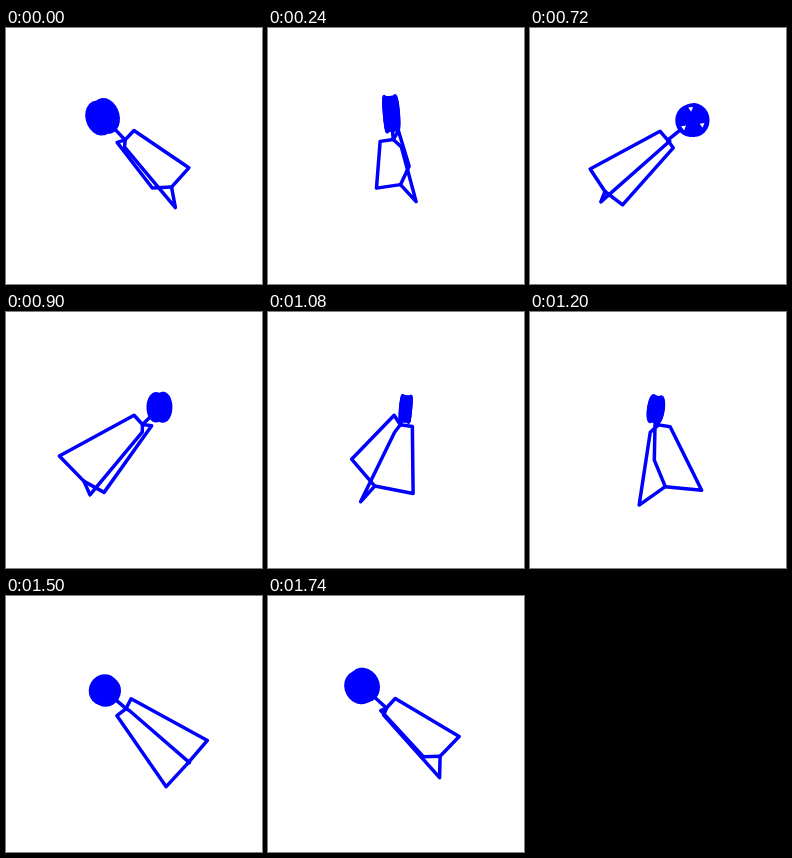
An HTML page with a canvas that plays this animation: 256 px wide and 256 px high, repeating every 1.8 s.

```html
<!DOCTYPE html>
<html lang="en">
<head>
<meta charset="utf-8">
<title>Spinning dart</title>
<style>
  html, body { margin: 0; width: 100%; height: 100%; overflow: hidden; background: #fff; }
  canvas { display: block; width: 100%; height: 100%; }
</style>
</head>
<body>
<canvas id="stage" width="256" height="256"></canvas>
<script>
const ctx = document.getElementById('stage').getContext('2d');
const BLUE = '#0000ff';
const STEPS = 30, STEP_MS = 60;
const RAD = Math.PI / 180;
const DISTANCE = 220, CENTER = 128;

// Model points are [radial, down, tangential] around the vertical spin axis.
const HEAD = [-34.2, -35.5, 0.7];
const NECK = [-9.6, -15.8, 1.6];
const TAIL = [53, 35.5, 0];

// Frame of the fins, square to the shaft.
const FIN_UP = [0.634, -0.774, 0], FIN_SIDE = [0, 0, 1];
const FIN_ANGLES = [-19.4, 100.6, 220.6];

// Frame of the head, a thick upright wheel.
const WHEEL_AXIS = [-0.2, 0.1, 0.97], WHEEL_X = [0.97, 0, 0.2], WHEEL_Y = [0, 0.995, -0.1];
const WHEEL_R = 14.7, HUB_R = 13.4, HALF_WIDTH = 4.5;

const offset = (p, u, a, v = u, b = 0) => p.map((c, i) => c + u[i] * a + v[i] * b);
const around = (p, u, v, r, deg) =>
  offset(p, u, r * Math.cos(deg * RAD), v, r * Math.sin(deg * RAD));

const fins = FIN_ANGLES.map(deg => [
  NECK,
  around(NECK, FIN_UP, FIN_SIDE, 12.7, deg),
  around(TAIL, FIN_UP, FIN_SIDE, 30, deg),
  TAIL
]);

const ring = (side, r) => Array.from({ length: 24 }, (_, i) =>
  around(offset(HEAD, WHEEL_AXIS, side * HALF_WIDTH), WHEEL_X, WHEEL_Y, r, i * 15));
const rims = [ring(-1, WHEEL_R), ring(1, WHEEL_R)];
const hubs = [ring(-1, HUB_R), ring(1, HUB_R)];

function turn([r, y, t], angle) {
  const c = Math.cos(angle), s = Math.sin(angle);
  return [r * c - t * s, y, -(r * s + t * c)];
}

function trace(points, angle) {
  ctx.beginPath();
  for (const p of points) {
    const [x, y, z] = turn(p, angle);
    const scale = DISTANCE / (DISTANCE - z);
    ctx.lineTo(CENTER + x * scale, CENTER + y * scale);
  }
}

function line(points, angle) {
  trace(points, angle);
  ctx.stroke();
}

function solid(points, angle, outline) {
  trace(points, angle);
  ctx.closePath();
  ctx.fill();
  if (outline) ctx.stroke();
}

function drawWheel(angle) {
  const [back, front] = hubs;
  back.forEach((p, i) => {
    const j = (i + 1) % back.length;
    solid([p, back[j], front[j], front[i]], angle, true);
  });
  rims.forEach(rim => solid(rim, angle, true));

  // Small openings show only when one side squarely faces the viewer.
  const facing = turn(WHEEL_AXIS, angle)[2];
  const size = 3 * Math.min(1, Math.max(0, (facing - 0.78) / 0.1));
  if (!size) return;
  ctx.fillStyle = '#fff';
  for (const deg of [-81, 39, 159]) {
    const hole = around(HEAD, WHEEL_X, WHEEL_Y, 11.5, deg);
    solid([0, 120, 240].map(d => around(hole, WHEEL_X, WHEEL_Y, size, deg + 180 + d)), angle);
  }
}

function draw(step) {
  const angle = (36 + step * 360 / STEPS) * RAD;
  ctx.fillStyle = '#fff';
  ctx.fillRect(0, 0, 256, 256);
  ctx.fillStyle = ctx.strokeStyle = BLUE;
  ctx.lineWidth = 3.5;
  ctx.lineCap = ctx.lineJoin = 'round';
  fins.forEach(fin => line(fin, angle));
  line([HEAD, NECK], angle);
  drawWheel(angle);
}

const start = performance.now();
function tick() {
  const elapsed = Math.max(0, performance.now() - start);
  draw(Math.floor(elapsed / STEP_MS) % STEPS);
  requestAnimationFrame(tick);
}
tick();
</script>
</body>
</html>
```
